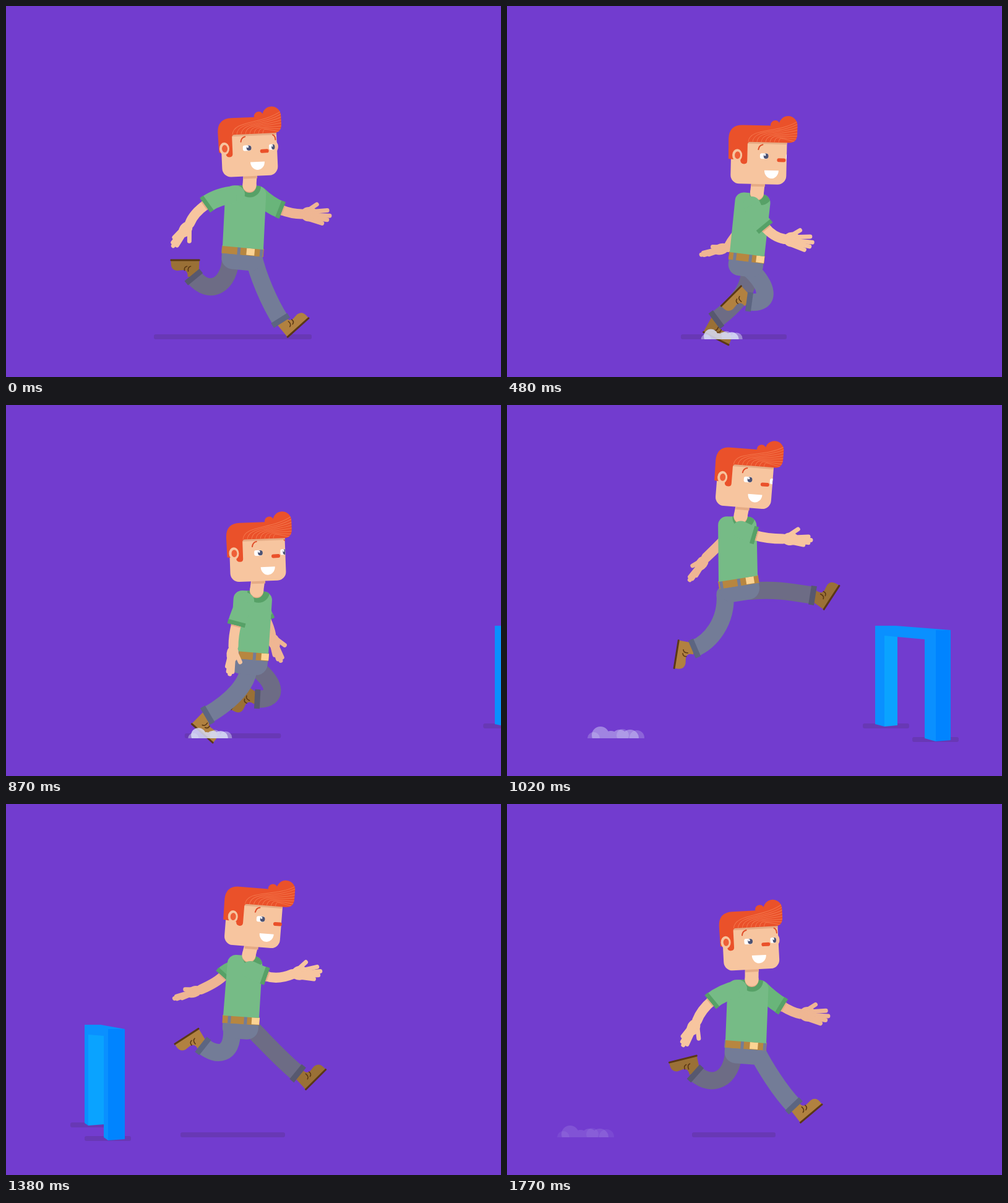
These frames come from a looping animation (800x600 px, 1.8 s). An HTML page with a canvas:

```html
<!DOCTYPE html>
<html lang="en">
<head>
<meta charset="utf-8">
<title>Running and jumping</title>
<style>
html, body { margin: 0; width: 100%; height: 100%; overflow: hidden; background: #723ccf; }
canvas { display: block; width: 800px; height: 600px; }
</style>
</head>
<body>
<canvas id="stage" width="800" height="600"></canvas>
<script>
const ctx = document.getElementById('stage').getContext('2d');
const LOOP = 1800, STEP = 30, RAD = Math.PI / 180;
const SKIN = '#f7c59f', FAR_SKIN = '#efb693', SHADE = '#e5ab85';
const GREEN = '#76bb86', FAR_GREEN = '#69b57a', HEM = '#57a167';
const HAIR = '#ea512a', SHADOW = '#6838b5';

// Torso corners (TL, TR, BL, BR), head corner, head tilt, face turn, buckle place
const BODY = {
  contact: [355, 290, 421, 291, 350, 388, 416, 394, 350, 277, -2.5, 42, .7],
  sink: [366, 300, 429, 303, 360, 398, 422, 403, 361, 287, -2, 46, .88],
  push: [375, 291, 436, 293, 369, 389, 431, 394, 368, 279, -2.5, 50, 1.1],
  glide: [359, 283, 416, 287, 351, 382, 409, 386, 352, 268, 3, 56, .92],
  contact2: [360, 290, 417, 294, 352, 389, 410, 393, 353, 275, 2.5, 56, .92],
  sink2: [370, 300, 427, 306, 360, 398, 416, 405, 361, 287, 1.3, 54, .9],
  push2: [369, 291, 430, 294, 364, 389, 424, 394, 363, 278, -1, 48, .8],
  air: [357, 284, 423, 285, 353, 382, 419, 387, 351, 270, -3, 42, .71],
  leap: [341, 180, 403, 181, 342, 286, 405, 276, 336, 162, 4.5, 50.5, .8],
  apex: [348, 168, 407, 171, 345, 273, 407, 267, 341, 150, 4.7, 53, .85],
  fall: [359, 243, 415, 247, 351, 342, 409, 346, 352, 227, 4.5, 56.6, .92]
};

// Hip, two curve handles, cuff (from the belt centre), shoe angle
const LEG = {
  contact: [17, 14, 24, 45, 42, 88, 61, 118, -42],
  sink: [2, 18, 10, 50, -15, 80, -50, 106, 27],
  push: [-12, 18, -30, 45, -70, 78, -110, 89, 84],
  kick: [-20, 17, -22, 60, -54, 76, -82, 51, 166],
  fold: [-20, 16, -21, 59, -53, 80, -80, 47, 180],
  pass: [2, 22, 35, 50, 40, 82, 3, 77, 135],
  knee: [15, 22, 55, 24, 75, 48, 39, 64, 65],
  reach: [17, 14, 30, 40, 55, 80, 78, 104, -40],
  leapBack: [-21, 25, -18, 70, -45, 102, -71, 113, 99],
  leapFront: [20, 20, 60, 16, 90, 22, 121, 27, -57],
  fallBack: [-15, 22, -14, 62, -38, 66, -62, 47, 147],
  fallFront: [20, 22, 40, 42, 65, 70, 92, 92, -45]
};

// Shoulder, hem, elbow, wrist (from the shoulder line centre), hand angle, finger spread
const NEAR_ARM = {
  back: [-16, 14, -64, 30, -85, 45, -91, 61, 125, .5],
  down: [-10, 18, -9, 58, -6, 78, -1, 96, 78, .42],
  front: [-3, 19, 18, 54, 32, 71, 50, 74, 4, 1],
  backAir: [-16, 14, -59, 34, -76, 48, -83, 66, 118, .55],
  leap: [6, 21, 28, 30, 48, 36, 74, 36, 1, .6],
  fall: [8, 23, 32, 33, 52, 40, 76, 30, -8, .85]
};
const FAR_ARM = {
  back: [20, 15, 56, 39, 74, 46, 90, 46, 1, .95],
  down: [5, 18, 5, 48, 5, 62, 0, 76, 95, .2],
  front: [-8, 20, -14, 52, -32, 70, -41, 87, 165, -.22],
  backAir: [20, 15, 54, 42, 72, 53, 84, 55, 2, .95],
  leap: [-10, 25, -17, 33, -29, 46, -50, 66, 127, -.3],
  fall: [-16, 22, -35, 32, -45, 43, -72, 55, 162, -.25]
};

const BEATS = [0, 105, 180, 345, 375, 480, 555, 720, 750, 855, 915, 1020, 1380, 1425, 1530, 1605, 1770, 1800];
const track = (poses, names, times) => names.split(' ').map((n, i) => [times[i], poses[n]]);
const body = track(BODY,
  'contact sink push glide contact2 sink2 push2 air contact sink push leap apex fall contact2 sink2 push2 air contact',
  [...BEATS.slice(0, 12), 1140, ...BEATS.slice(12)]);
const nearLeg = track(LEG,
  'contact sink push kick fold pass knee reach contact sink push leapBack fallBack fold pass knee reach contact', BEATS);
const farLeg = track(LEG,
  'fold pass knee reach contact sink push kick fold pass knee leapFront fallFront contact sink push kick fold', BEATS);
const swing = 'back down fall front down backAir back down leap fall front down backAir back';
const swingTimes = [0, 180, 360, 480, 560, 720, 750, 915, 1020, 1380, 1530, 1610, 1770, 1800];
const nearArm = track(NEAR_ARM, swing, swingTimes);
const farArm = track(FAR_ARM, swing, swingTimes);
const shadowWidth = [[0, [255]], [180, [229]], [345, [175]], [480, [171]], [720, [169]], [900, [150]],
  [1000, [0]], [1200, [0]], [1380, [169]], [1770, [135]], [1800, [130]]];

// Puff centre, size, opacity by age
const puffLife = [[40, [424, .35, .5]], [105, [347, .7, .85]], [180, [263, .88, .75]],
  [270, [176, 1, .45]], [345, [127, 1, .33]], [430, [80, 1.05, 0]]];

// Smooth interpolation without overshoot
function sample(keys, t) {
  const last = keys.length - 1;
  let i = 0;
  while (i < last - 1 && t >= keys[i + 1][0]) i++;
  const gap = keys[i + 1][0] - keys[i][0];
  const u = Math.min(1, Math.max(0, (t - keys[i][0]) / gap));
  const slope = (j, n) => (keys[j + 1][1][n] - keys[j][1][n]) / (keys[j + 1][0] - keys[j][0]);
  const tangent = (j, n) => {
    if (j === 0) return slope(0, n);
    if (j === last) return slope(last - 1, n);
    const a = slope(j - 1, n), b = slope(j, n);
    return a * b > 0 ? 2 * a * b / (a + b) : 0;
  };
  return keys[i][1].map((p, n) => {
    const q = keys[i + 1][1][n], v = 1 - u;
    return p * v * v * (1 + 2 * u) + q * u * u * (3 - 2 * u)
      + gap * u * v * (v * tangent(i, n) - u * tangent(i + 1, n));
  });
}

function fill(color) { ctx.fillStyle = color; ctx.fill(); }
function stroke(color, width, cap = 'butt') {
  ctx.strokeStyle = color; ctx.lineWidth = width; ctx.lineCap = cap; ctx.stroke();
}
function poly(color, ...pts) {
  ctx.beginPath();
  pts.forEach(p => ctx.lineTo(p[0], p[1]));
  ctx.closePath();
  fill(color);
}
function oval(color, x, y, rx, ry = rx) {
  ctx.beginPath(); ctx.ellipse(x, y, rx, ry, 0, 0, 7); fill(color);
}
function bar(color, x, y, w, h, r = 0) {
  ctx.beginPath(); ctx.roundRect(x, y, w, h, r); fill(color);
}
function at(x, y, angle, draw) {
  ctx.save(); ctx.translate(x, y); ctx.rotate(angle); draw(); ctx.restore();
}

function hurdle(t) {
  const k = (t - 1020) / 360, X = (a, b) => a + (b - a) * k;
  const x0 = X(595, 127), x1 = X(610, 133), x2 = X(631, 159);
  const x3 = X(675, 158), x4 = X(693, 165), x5 = X(717, 192);
  if (x0 > 830 || x5 < -20) return;
  const mid = '#0a90ff';
  bar(SHADOW, X(575, 104), 515, 75, 8, 3);
  bar(SHADOW, X(655, 127), 537, 75, 8, 3);
  poly('#0aa3ff', [x1, 372], [x2, 372], [x2, 518], [x1, 520]);
  poly(mid, [x0, 357], [x1, 357], [x1, 520], [x0, 516]);
  poly(mid, [x0, 357], [X(628, 153), 357], [x5, 364], [x4, 381], [x3, 379], [x2, 375], [x1, 373]);
  poly(mid, [x3, 364], [x4, 364], [x4, 544], [x3, 539]);
  poly('#0084ff', [x4, 364], [x5, 364], [x5, 542], [x4, 544]);
}

function puff(age, fade) {
  if (age < 40 || age * fade > 430) return;
  const [x, size] = sample(puffLife, age), alpha = sample(puffLife, age * fade)[2];
  const cloud = (opacity, circles) => {
    ctx.globalAlpha = opacity;
    ctx.beginPath();
    for (const [dx, y, r] of circles) {
      const cx = x + dx * size, rr = r * (.4 + .6 * size);
      ctx.moveTo(cx + rr, y);
      ctx.arc(cx, y, rr, 0, 7);
    }
    fill('#d8dcf6');
  };
  ctx.save();
  ctx.beginPath(); ctx.rect(0, 480, 800, 59); ctx.clip();
  cloud(alpha * .55, [[-36, 539, 10], [11, 534, 10], [34, 538, 12]]);
  cloud(alpha, [[-25, 534, 14], [-8, 540, 13], [6, 538, 13], [23, 539, 14]]);
  ctx.restore();
}

function shoe(color) {
  ctx.beginPath();
  ctx.moveTo(0, 0);
  ctx.lineTo(1, -27);
  ctx.lineTo(19, -27);
  ctx.quadraticCurveTo(18, -17, 26, -16);
  ctx.lineTo(36, -17);
  ctx.quadraticCurveTo(46, -16, 46, -5);
  ctx.lineTo(46, 0);
  fill(color);
  ctx.beginPath();
  for (const x of [18, 24]) {
    ctx.moveTo(x, -18 + (x - 18) / 4);
    ctx.quadraticCurveTo(x + 1, -11, x - 4, -10);
  }
  stroke('#5b3815', 1.6, 'round');
  bar('#5b3815', -1, -1.5, 48, 3, 1);
}

function leg(p, mx, my, cloth, cuff, leather) {
  const [hx, hy, ax, ay, bx, by, ex, ey, foot] = p;
  ctx.save();
  ctx.translate(mx, my);
  at(ex, ey, foot * RAD, () => { ctx.translate(-9.5, 27); shoe(leather); });
  oval(cloth, hx, hy, 14);
  ctx.beginPath();
  ctx.moveTo(hx, hy);
  ctx.bezierCurveTo(ax, ay, bx, by, ex, ey);
  stroke(cloth, 28);
  at(ex, ey, Math.atan2(ey - by, ex - bx), () => bar(cuff, -5, -15.5, 9, 31));
  ctx.restore();
}

function hand(spread, skin) {
  const thumb = Math.max(-1, Math.min(1, spread * 2));
  oval(skin, 12, 0, 14, 8 + 4 * Math.abs(spread));
  const finger = (x, y, tx, ty) => {
    ctx.beginPath(); ctx.moveTo(x, y); ctx.lineTo(tx, ty); stroke(skin, 7, 'round');
  };
  finger(8, -5 * thumb, 24, -16 * thumb);
  [[41, -7], [45, 2], [41, 9], [33, 15]].forEach(([x, y]) => finger(14, y * .6 * spread, x, y * spread));
}

function arm(p, mx, my, skin, cloth) {
  const [sx, sy, hx, hy, cx, cy, wx, wy, angle, spread] = p;
  const dir = Math.atan2(cy - hy, cx - hx), reach = Math.hypot(hx - sx, hy - sy) * .45;
  ctx.save();
  ctx.translate(mx, my);
  ctx.beginPath();
  ctx.moveTo(hx, hy);
  ctx.quadraticCurveTo(cx, cy, wx, wy);
  stroke(skin, 16, 'round');
  at(wx, wy, angle * RAD, () => hand(spread, skin));
  oval(cloth, sx, sy, 14);
  ctx.beginPath();
  ctx.moveTo(sx, sy);
  ctx.quadraticCurveTo(hx - Math.cos(dir) * reach, hy - Math.sin(dir) * reach, hx, hy);
  stroke(cloth, 28);
  at(hx, hy, dir, () => {
    bar(HEM, -4, -14.5, 7, 29);
    bar(SHADE, 3, -8, 2, 16);
  });
  ctx.restore();
}

function hips(b) {
  const [, , , , x, y, rx, ry, , , , , buckle] = b;
  const w = Math.hypot(rx - x, ry - y);
  at(x, y, Math.atan2(ry - y, rx - x), () => {
    bar('#737c97', 0, 8, w, 28, [0, 0, 18, 18]);
    ctx.beginPath(); ctx.rect(-1, -2, w + 2, 14); ctx.clip();
    bar('#b78640', -1, -1, w + 2, 13);
    for (const d of [-.75, -.3, .25]) bar('#737c97', (buckle + d) * w - 2, -1, 5, 13);
    bar('#fcd393', buckle * w - 7, 0, 13, 11);
  });
}

function shirt(b) {
  const [lx, ly, rx, ry, bx, by, ex, ey, , , , turn] = b;
  const mx = (lx + rx) / 2, my = (ly + ry) / 2;
  ctx.save();
  ctx.beginPath();
  ctx.moveTo(bx, by);
  ctx.arcTo(lx, ly, rx, ry, 14);
  ctx.arcTo(rx, ry, ex, ey, 14);
  ctx.lineTo(ex, ey);
  ctx.closePath();
  fill(GREEN);
  ctx.clip();
  oval(HEM, mx + 6 + (turn - 42) * .5, my + 1, 18);
  ctx.restore();
}

function hairShape(side, right) {
  ctx.beginPath();
  ctx.moveTo(-4, -40);
  ctx.lineTo(-4.5, -73);
  ctx.quadraticCurveTo(-4, -95, 18, -95);
  ctx.lineTo(right - 43, -95);
  ctx.arc(right - 36, -96, 7.5, Math.PI, -.4);
  ctx.arc(right - 15, -96, 15, Math.PI, 0);
  ctx.lineTo(right, -82);
  ctx.quadraticCurveTo(right, -68, right - 13, -68);
  ctx.lineTo(side + 3, -68);
  ctx.quadraticCurveTo(side, -67, side, -64);
  ctx.lineTo(side, -37);
  ctx.quadraticCurveTo(side, -32, side - 5, -32);
  ctx.quadraticCurveTo(side - 11, -32, side - 11, -38);
  ctx.closePath();
}

function eye(x, w) {
  bar('#fff', x - w * .55, -50, w, 9, 3);
  oval('#4b5274', x + w * .2, -45.5, w * .3, 4.2);
  oval('#fff', x + w * .06, -47.5, w * .12, 1.7);
}

function head(b) {
  const [, , , , , , , , x, y, tilt, v] = b;
  const d = v - 42, side = 18 + d * .7, right = 98.5 + d * .65;
  at(x, y, tilt * RAD, () => {
    oval(SKIN, 86 - d * 1.2, -46, 6, 9);
    bar(SKIN, 0, -90, 90, 90, 14);
    ctx.save();
    ctx.beginPath(); ctx.roundRect(0, -90, 90, 90, 14); ctx.clip();
    bar(SHADE, side, -69, 90, 4);
    eye(v, 13);
    eye(v + 40, 9);
    ctx.beginPath();
    ctx.moveTo(v - 10, -56);
    ctx.quadraticCurveTo(v - 9, -63, v - 3, -64);
    ctx.moveTo(v + 42, -65);
    ctx.quadraticCurveTo(v + 46, -63, v + 46, -57);
    stroke('#df4e2a', 2, 'round');
    ctx.restore();
    ctx.beginPath();
    ctx.ellipse(57.5 + d * .7, -22.5, 11.5, 13, 0, 0, Math.PI);
    fill('#fff');
    bar('#ea512a', v + 20.5, -42.5, 14, 6, 3);

    hairShape(side, right);
    fill(HAIR);
    ctx.save();
    ctx.clip();
    ctx.beginPath();
    for (let i = 0; i < 8; i++) {
      const sx = side + 1 + i * 7;
      ctx.moveTo(sx, -68);
      ctx.bezierCurveTo(sx + 2, -92 + i * 2, right - 30, -82 + i, right + 2, -104 + i * 5);
    }
    stroke('#f4764b', 1);
    ctx.restore();
    const ear = 5 + d * .42;
    oval(SKIN, ear, -46, 8, 10);
    oval('#ee6038', ear + .5, -46, 4.5, 6);
  });
}

function neck(b) {
  const [lx, ly, rx, ry, , , , , x, y, tilt] = b;
  const a = tilt * RAD, c = Math.cos(a), s = Math.sin(a);
  const tx = x + 45 * c + 5 * s, ty = y + 45 * s - 5 * c;
  const ex = (lx + rx) / 2 + 5.5, ey = (ly + ry) / 2 - 1;
  oval(SHADE, ex, ey + 1.5, 11);
  ctx.beginPath(); ctx.moveTo(tx, ty); ctx.lineTo(ex, ey); stroke(SKIN, 22);
  oval(SKIN, ex, ey, 11);
  at(tx, ty, a, () => bar(SHADE, -11, 0, 22, 9));
}

function runner(t) {
  const b = sample(body, t);
  const topX = (b[0] + b[2]) / 2, topY = (b[1] + b[3]) / 2;
  const hipX = (b[4] + b[6]) / 2, hipY = (b[5] + b[7]) / 2;
  arm(sample(farArm, t), topX, topY, FAR_SKIN, FAR_GREEN);
  leg(sample(farLeg, t), hipX, hipY, '#6d6c85', '#57586f', '#9a7036');
  leg(sample(nearLeg, t), hipX, hipY, '#737c97', '#5c6581', '#b18140');
  hips(b);
  shirt(b);
  neck(b);
  head(b);
  arm(sample(nearArm, t), topX, topY, SKIN, GREEN);
}

function draw(t) {
  ctx.fillStyle = '#723ccf';
  ctx.fillRect(0, 0, 800, 600);
  const w = sample(shadowWidth, t)[0];
  if (w > 1) bar(SHADOW, 366.5 - w / 2, 531, w, 8, 3);
  hurdle(t);
  runner(t);
  puff(t, 1);
  puff(t - 375, 1);
  puff(t - 750, 1);
  puff(t - 1425, 1.15);
}

const start = performance.now();
function tick() {
  const t = (performance.now() - start) % LOOP;
  draw(Math.floor(t / STEP) * STEP);
  requestAnimationFrame(tick);
}
tick();
</script>
</body>
</html>
```
